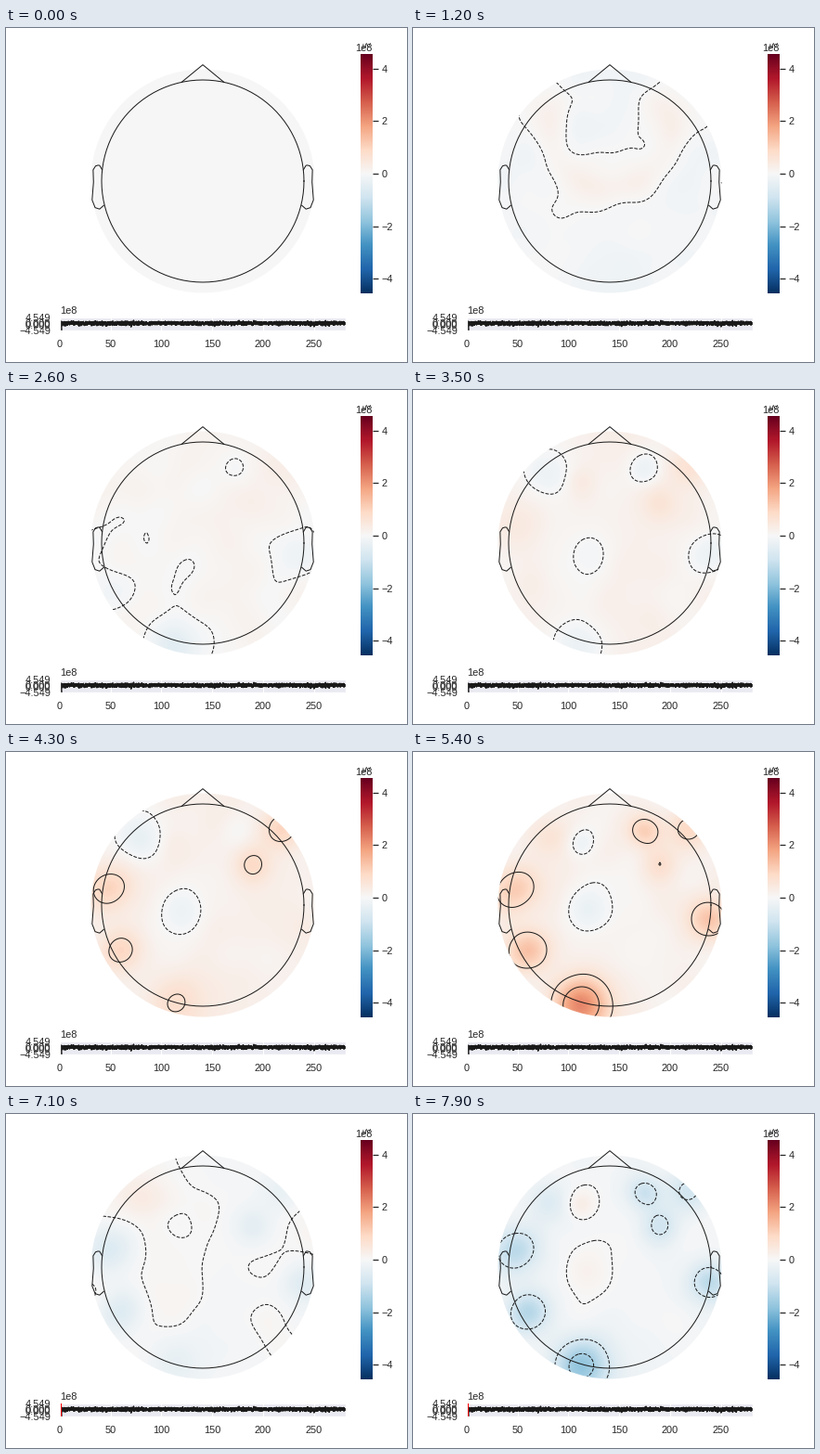
A matplotlib script for the animation above (8000 ms loop, 432x360 px).

```python
import numpy as np
import matplotlib.pyplot as plt
from matplotlib.animation import FuncAnimation
from matplotlib.patches import Circle

W, H, DPI = 432, 360, 72
FRAMES, STEP_MS = 80, 100
VMAX = 4.549
CX, CY, R = 212, 165, 109
INK, TEXT = "#1a1a1a", "#262626"
LEVELS = 0.75 * np.arange(-3, 4)
STYLES = ["--" if v <= 0 else "-" for v in LEVELS]
CURSOR_TIME = 5.8  # the red cursor leaves the first pixel column

plt.rcParams.update({"font.family": "Liberation Sans", "font.size": 11,
                     "text.color": TEXT, "xtick.color": TEXT,
                     "ytick.color": TEXT})

GX, GY = np.meshgrid(np.arange(88, 337, 2), np.arange(41, 290, 2))
rng = np.random.default_rng(4)

# Strong sources: x, y, radius, peak, rising zero crossing (s), period (s)
SOURCES = [
    (180, 272, 30, 2.0, 3.9, 6.0),
    (110, 148, 26, 1.2, 3.0, 7.0),
    (125, 213, 24, 1.3, 3.3, 6.6),
    (297, 83, 24, 1.2, 1.6, 10.0),
    (320, 180, 22, 1.1, 4.2, 5.0),
    (250, 85, 18, 1.1, 4.5, 5.2),
    (146, 94, 24, 0.9, 5.0, 4.8),
    (266, 120, 20, 0.9, 1.9, 9.0),
    (190, 172, 24, 0.5, 7.2, 11.0),
    (180, 98, 16, 0.5, 7.0, 5.0),
]


def hill(x, y, r):
    return np.exp(-((GX - x) ** 2 + (GY - y) ** 2) / r ** 2)


def wave(t, start, period):
    return np.sin(2 * np.pi * (t - start) / period)


# Weak background activity on rings of electrodes
RIPPLES = []
for ring in range(1, 5):
    for a in np.linspace(0, 2 * np.pi, 6 * ring, endpoint=False):
        shape = hill(CX + 30 * ring * np.cos(a), CY + 30 * ring * np.sin(a), 20)
        RIPPLES.append((shape, rng.uniform(0, 8), rng.uniform(5, 9)))

HILLS = [(peak * hill(x, y, r), start, period)
         for x, y, r, peak, start, period in SOURCES]

# Horseshoe that shows up early, open towards the nose
RHO = np.hypot(GX - 213, GY - 110)
HORSESHOE = np.exp(-((RHO - 64) / 20) ** 2) / (1 + np.exp((75 - GY) / 6))


def field(t):
    drift = 0.2 * wave(t, 1.9, 10.5)
    ripple = 0.09 * sum(s * wave(t, t0, p) for s, t0, p in RIPPLES)
    early = 0.28 * HORSESHOE * np.exp(-((t - 1.2) / 0.8) ** 2)
    strong = sum(s * wave(t, t0, p) for s, t0, p in HILLS)
    return min(1, t) * (drift + ripple + early) + min(1, t / 5) ** 2 * strong


fig = plt.figure(figsize=(W / DPI, H / DPI), dpi=DPI, facecolor="white")


def px_axes(x0, y0, x1, y1):
    return fig.add_axes([x0 / W, 1 - y1 / H, (x1 - x0) / W, (y1 - y0) / H])


# Signal strip
strip = px_axes(58, 311.5, 365.5, 326)
strip.set_facecolor("#eaeaf2")
strip.set(xlim=(0, 281), ylim=(-VMAX, VMAX))
strip.set_axisbelow(True)
strip.grid(color="white", lw=1)
for side in strip.spines.values():
    side.set(color="white", lw=1.25)
strip.set_xticks(range(0, 251, 50))
strip.set_yticks([VMAX, .5, -.7, -VMAX], ["4.549", "0.000", "0.000", "−4.549"])
strip.tick_params(length=0, pad=9.5)
signal = rng.normal(.3, .6, 4000)
signal[:8] = np.linspace(0, -VMAX, 8)
strip.plot(np.linspace(1, 281, 4000), signal, color=INK, lw=1.5)
cursor = strip.axvline(1, color="red", lw=1, zorder=4)

# Colour bar
bar = px_axes(382, 28, 395, 286)
bar.imshow(np.linspace(-1, 1, 256)[:, None], cmap="RdBu_r", aspect="auto",
           origin="lower", extent=(0, 1, -VMAX, VMAX))
bar.set_xticks([])
bar.set_yticks(range(-4, 5, 2))
bar.yaxis.tick_right()
bar.tick_params(length=6, width=1.25, pad=3.5)
for side in bar.spines.values():
    side.set_visible(False)

# Head
ax = px_axes(0, 0, W, H)
ax.set(xlim=(0, W), ylim=(H, 0))
ax.axis("off")
ax.text(58, 308, "1e8")
ax.text(395, 25, "1e8", ha="right")
ax.text(389, 21, "μV", ha="center", fontsize=8)

disc = Circle((CX, CY), 120.5, transform=ax.transData)
image = ax.imshow(field(0), cmap="RdBu_r", vmin=-VMAX, vmax=VMAX,
                  extent=(87, 337, 290, 40), interpolation="bilinear",
                  aspect="auto")
image.set_clip_path(disc)


def outline(x, y):
    ax.plot(CX + R * np.asarray(x), CY - R * np.asarray(y),
            color=INK, lw=1, zorder=4)


angle = np.linspace(0, 2 * np.pi, 101)
outline(np.cos(angle), np.sin(angle))
outline([-.2094, 0, .2094], [.978, 1.15, .978])
ear_x = 2 * np.array([.497, .510, .518, .5299, .5419, .54, .547, .532, .510, .489])
ear_y = 2 * np.array([.0555, .0775, .0783, .0746, .0555, -.0055, -.0932, -.1313,
                      -.1384, -.1199])
outline(ear_x, ear_y)
outline(-ear_x, ear_y)

contours = []


def update(i):
    while contours:
        contours.pop().remove()
    t = i * STEP_MS / 1000
    z = field(t)
    image.set_data(z)
    if i > 0:
        lines = ax.contour(GX, GY, z, levels=LEVELS, colors=INK,
                           linewidths=1, linestyles=STYLES, zorder=3)
        lines.set_clip_path(disc)
        contours.append(lines)
    cursor.set_visible(t >= CURSOR_TIME)
    return [image, cursor]


anim = FuncAnimation(fig, update, frames=FRAMES, interval=STEP_MS,
                     init_func=lambda: [], repeat=True, repeat_delay=0,
                     blit=False)
plt.show()
```
